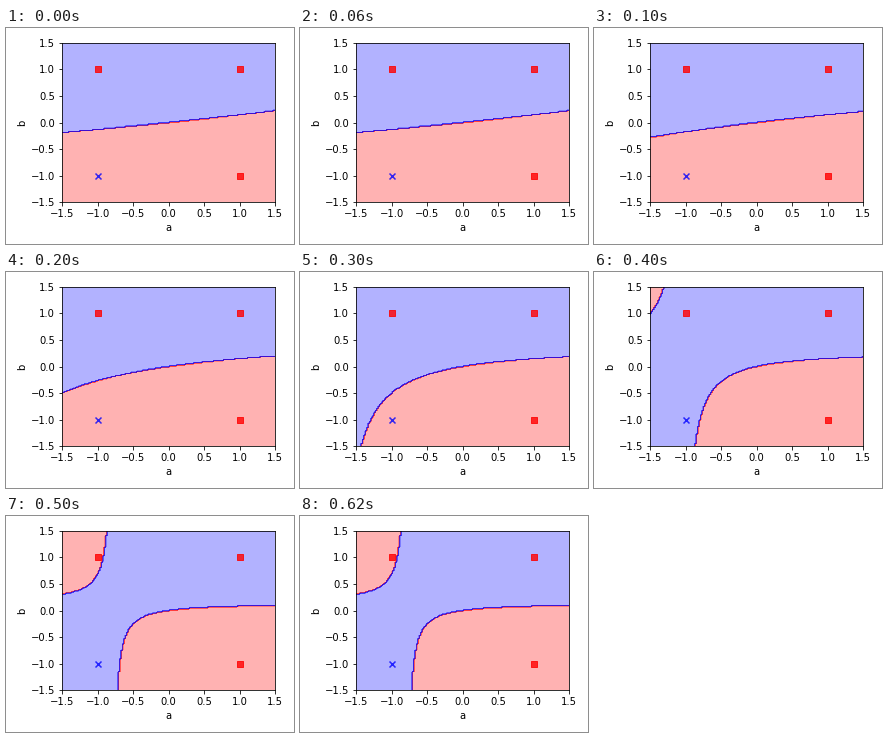
Animation of 288x216 px, one loop 700 ms. Source, as a matplotlib script:

```python
import numpy as np
import matplotlib.pyplot as plt
from matplotlib.animation import FuncAnimation
from matplotlib.colors import ListedColormap

LIMIT = 1.5
STEP = 0.02
CMAP = ListedColormap(["red", "blue"])

# Weights of a, b and a*b after each training epoch
WEIGHTS = [
    (-1, 7.27, -0.40),
    (-1, 6.27, 0.59),
    (-1, 5.27, 1.50),
    (-1, 4.43, 2.43),
    (-1, 3.405, 3.27),
    (-1, 5.43, 6.88),
]
FRAMES = len(WEIGHTS) + 1  # the last epoch is held for one more frame

grid = np.arange(-LIMIT, LIMIT + STEP / 2, STEP)
A, B = np.meshgrid(grid, grid)

fig, ax = plt.subplots(figsize=(4, 3), dpi=72)
ax.scatter([-1, 1, 1], [1, 1, -1], color="red", marker="s", alpha=0.8, zorder=2)
ax.scatter([-1], [-1], color="blue", marker="x", alpha=0.8, zorder=2)
ax.set(xlim=(-LIMIT, LIMIT), ylim=(-LIMIT, LIMIT), xlabel="a", ylabel="b")
ticks = np.arange(-LIMIT, LIMIT + 0.1, 0.5)
ax.set_xticks(ticks)
ax.set_yticks(ticks)
fig.tight_layout()

regions = None


def update(frame):
    global regions
    if regions is not None:
        regions.remove()
    wa, wb, wab = WEIGHTS[min(frame, len(WEIGHTS) - 1)]
    label = np.where(wa * A + wb * B + wab * A * B >= 0, 1, -1)
    regions = ax.contourf(A, B, label, alpha=0.3, cmap=CMAP, zorder=0)
    return [regions]


anim = FuncAnimation(fig, update, frames=FRAMES, init_func=lambda: [],
                     interval=100, repeat=True, repeat_delay=0)
plt.show()
```
